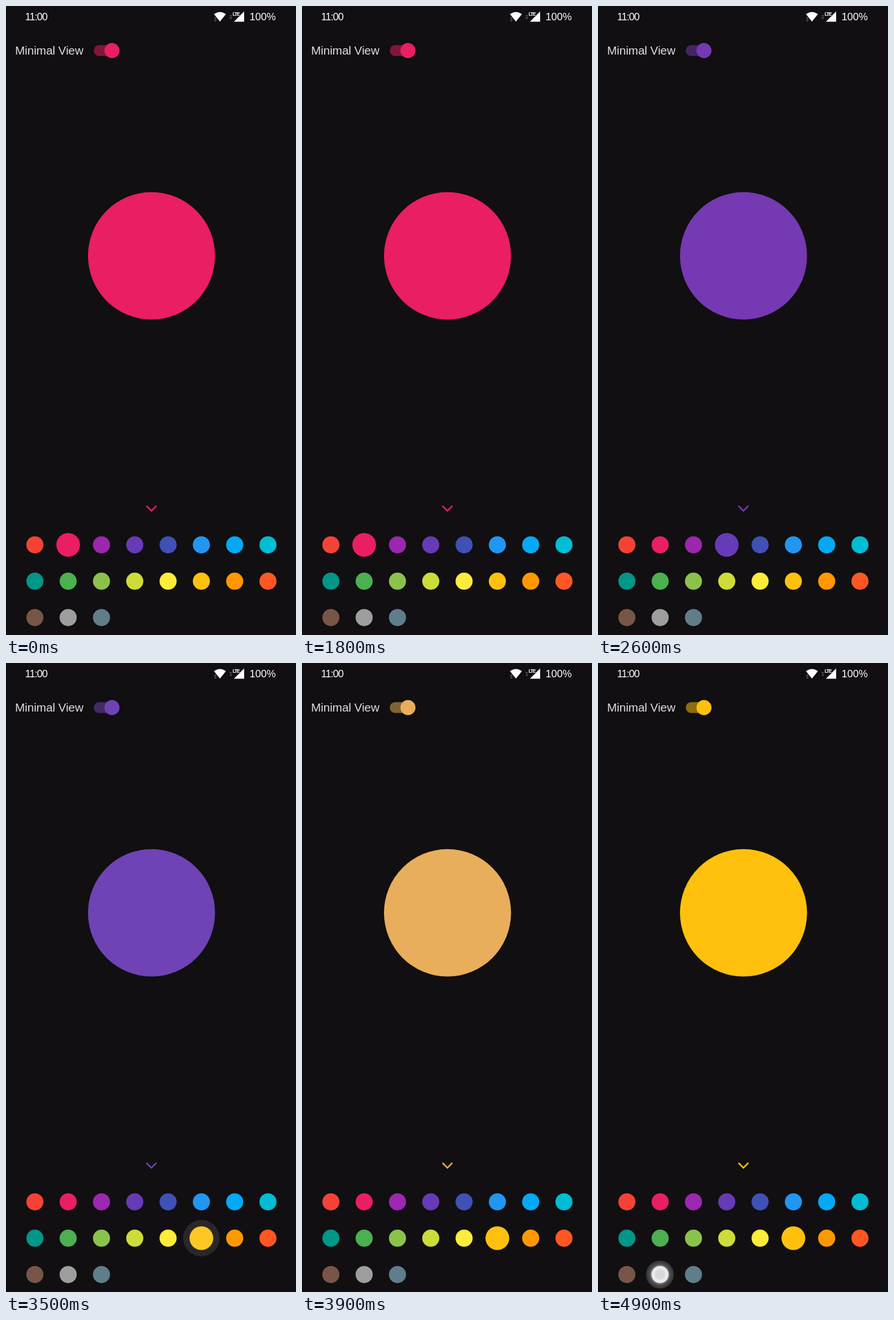
These frames come from a looping animation (509 px wide and 1101 px high, 5 s). An HTML page without scripts:

```html
<!DOCTYPE html>
<html lang="en">
<head>
<meta charset="utf-8">
<title>Accent picker</title>
<style>
  @property --violet { syntax: "<percentage>"; inherits: true; initial-value: 0%; }
  @property --amber { syntax: "<percentage>"; inherits: true; initial-value: 0%; }

  html, body { margin: 0; width: 100%; height: 100%; overflow: hidden; background: #110f11; }
  svg { display: block; width: 509px; height: 1101px; font-family: "Liberation Sans", Arial, sans-serif; }

  /* The accent fades in linear light: pink, then violet, then amber. */
  .accent {
    color: color-mix(in srgb-linear,
      color-mix(in srgb-linear, #e91e63, #673ab7 var(--violet)),
      #ffc10d var(--amber));
    fill: currentColor;
  }
  .accent, .picked, .touch, .ripple { animation: 5s step-end infinite; }
  .accent { animation-name: tint; }
  .pink { animation-name: pick-first; }
  .violet { animation-name: pick-second; }
  .amber { animation-name: pick-third; }
  .touch, .ripple { opacity: 0; }
  .violet-touch { animation-name: touch-violet; }
  .amber-touch { animation-name: touch-amber; }
  .grey-touch { animation-name: touch-grey; }
  .violet-ripple { animation-name: ripple-violet; }
  .amber-ripple { animation-name: ripple-amber; }

  @keyframes tint {
    0% { --violet: 0%; --amber: 0%; }
    40% { --violet: 2.8%; }
    42% { --violet: 13%; }
    44% { --violet: 36%; }
    46% { --violet: 61%; }
    48% { --violet: 78%; }
    50% { --violet: 88%; }
    52% { --violet: 94%; }
    54% { --violet: 97.5%; }
    56% { --violet: 99.5%; }
    58% { --violet: 100%; }
    70% { --amber: 2.8%; }
    72% { --amber: 13%; }
    74% { --amber: 36%; }
    76% { --amber: 61%; }
    78% { --amber: 78%; }
    80% { --amber: 88%; }
    82% { --amber: 94%; }
    84% { --amber: 97.5%; }
    86% { --amber: 99.5%; }
    88%, 100% { --violet: 100%; --amber: 100%; }
  }
  @keyframes pick-first { 0% { r: 20.8px; } 40%, 100% { r: 15px; } }
  @keyframes pick-second { 0% { r: 15px; } 40% { r: 20.8px; } 70%, 100% { r: 15px; } }
  @keyframes pick-third { 0% { r: 15px; } 70%, 100% { r: 20.8px; } }
  @keyframes touch-violet { 0% { opacity: 0; } 38% { opacity: 1; } 40%, 100% { opacity: 0; } }
  @keyframes touch-amber { 0% { opacity: 0; } 68% { opacity: 1; } 70%, 100% { opacity: 0; } }
  @keyframes touch-grey { 0% { opacity: 0; } 98%, 100% { opacity: 1; } }
  @keyframes ripple-violet { 0% { opacity: 0; } 40% { opacity: .1; } 42% { opacity: .04; } 44%, 100% { opacity: 0; } }
  @keyframes ripple-amber { 0% { opacity: 0; } 70% { opacity: .1; } 72% { opacity: .04; } 74%, 100% { opacity: 0; } }
</style>
</head>
<body>
<svg viewBox="0 0 509 1101">
  <defs>
    <radialGradient id="glow">
      <stop offset="0" stop-color="#fff" stop-opacity=".58"/>
      <stop offset=".3" stop-color="#fff" stop-opacity=".62"/>
      <stop offset=".46" stop-color="#fff" stop-opacity=".82"/>
      <stop offset=".57" stop-color="#fff" stop-opacity=".74"/>
      <stop offset=".64" stop-color="#e4e2ff" stop-opacity=".42"/>
      <stop offset=".74" stop-color="#fff" stop-opacity=".25"/>
      <stop offset=".96" stop-color="#fff" stop-opacity=".15"/>
      <stop offset="1" stop-color="#fff" stop-opacity="0"/>
    </radialGradient>
    <path id="arrows" d="M0 3.2 2.5 0 5 3.2ZM0 5 2.5 8.2 5 5Z" fill="#59575a"/>
  </defs>
  <rect width="509" height="1101" fill="#110f11"/>
  <rect width="1" height="1101" fill="#050405"/>

  <!-- Status bar -->
  <g fill="#fff">
    <text x="33.5" y="25" font-size="18" letter-spacing="-1">11:00</text>
    <use href="#arrows" x="365" y="19.5"/>
    <path d="M365 14.3Q375.5 6.5 386 14.3L375.5 27.3Z"/>
    <use href="#arrows" x="392" y="15"/>
    <path d="M400 27.5H418V9.5L410.5 17H410.5Z"/>
    <path d="M397 9H410.5V18H397Z" fill="#110f11"/>
    <text x="397.8" y="16.5" font-size="8.5" font-weight="700" letter-spacing="-1.3">LTE</text>
    <text x="427.5" y="25.2" font-size="18">100%</text>
  </g>

  <text x="16" y="85" font-size="20.6" letter-spacing="-.1" fill="#e0dfe0">Minimal View</text>

  <g class="accent">
    <rect x="154" y="68.5" width="40" height="19" rx="9.5" opacity=".52"/>
    <circle cx="186" cy="78" r="13.2"/>
    <circle cx="255.4" cy="437.3" r="111.5"/>
    <path d="M246.5 875 255.2 883.7 263.9 875" fill="none" stroke="currentColor" stroke-width="2.6"/>
  </g>

  <!-- Palette -->
  <g transform="translate(50.7 943.2)">
    <circle r="15" fill="#f44336"/>
    <circle class="picked pink" cx="58.4" r="15" fill="#e91e63"/>
    <circle cx="116.9" r="15" fill="#9c27b0"/>
    <circle class="picked violet" cx="175.3" r="15" fill="#673ab7"/>
    <circle cx="233.8" r="15" fill="#3f51b5"/>
    <circle cx="292.2" r="15" fill="#2196f3"/>
    <circle cx="350.7" r="15" fill="#03a9f4"/>
    <circle cx="409.1" r="15" fill="#00bcd4"/>
  </g>
  <g transform="translate(50.7 1006.8)">
    <circle r="15" fill="#009688"/>
    <circle cx="58.4" r="15" fill="#4caf50"/>
    <circle cx="116.9" r="15" fill="#8bc34a"/>
    <circle cx="175.3" r="15" fill="#cddc39"/>
    <circle cx="233.8" r="15" fill="#ffeb3b"/>
    <circle class="picked amber" cx="292.2" r="15" fill="#ffc10d"/>
    <circle cx="350.7" r="15" fill="#ff9800"/>
    <circle cx="409.1" r="15" fill="#ff5722"/>
  </g>
  <g transform="translate(50.7 1070.4)">
    <circle r="15" fill="#795548"/>
    <circle cx="58.4" r="15" fill="#9e9e9e"/>
    <circle cx="116.9" r="15" fill="#607d8b"/>
  </g>

  <g fill="#fff">
    <circle class="ripple violet-ripple" cx="226" cy="943.2" r="32"/>
    <circle class="ripple amber-ripple" cx="342.9" cy="1006.8" r="32"/>
  </g>
  <g fill="url(#glow)">
    <circle class="touch violet-touch" cx="226" cy="943.2" r="25"/>
    <circle class="touch amber-touch" cx="342.9" cy="1006.8" r="25"/>
    <circle class="touch grey-touch" cx="108.7" cy="1070.4" r="25"/>
  </g>
</svg>
</body>
</html>
```
